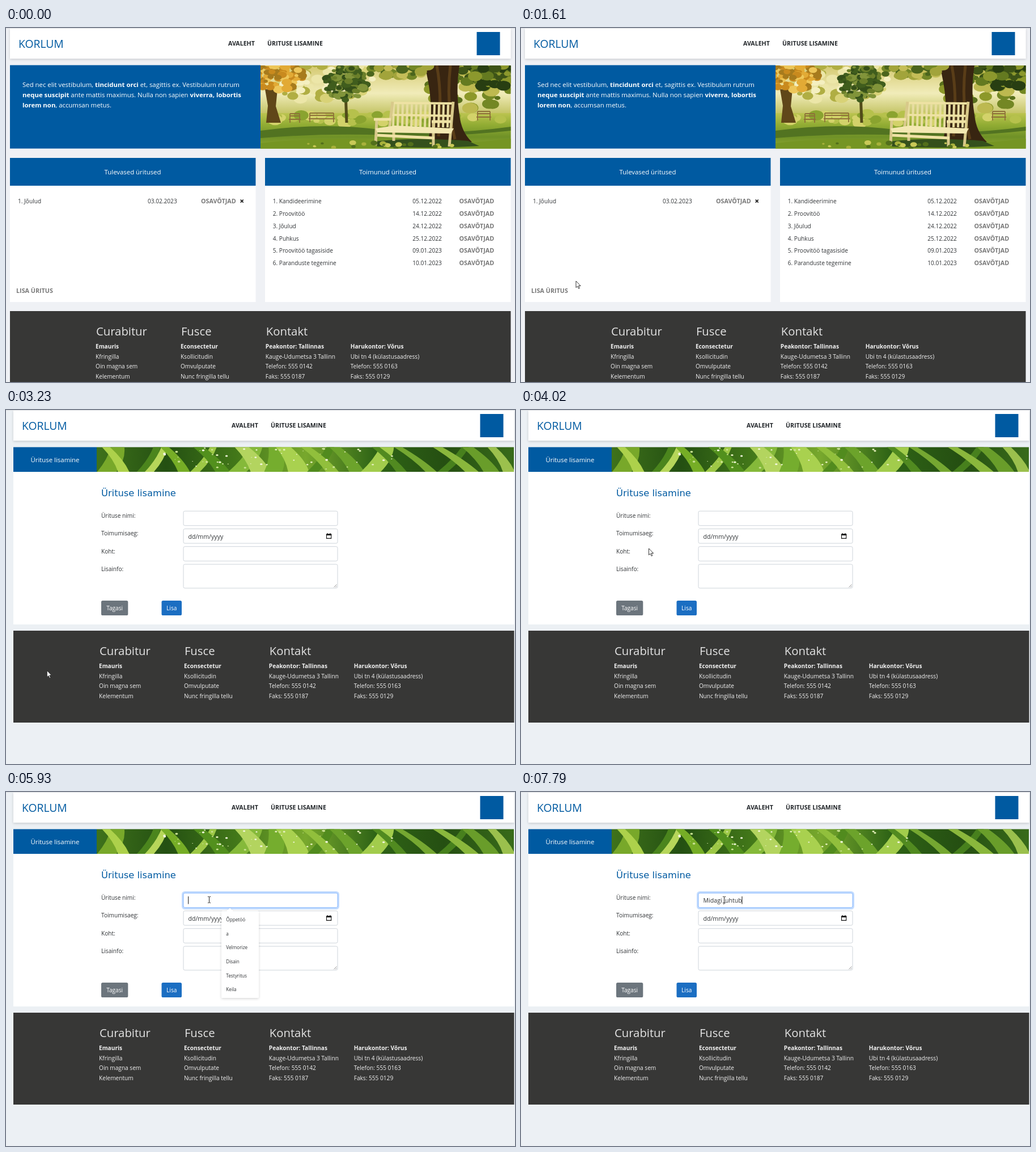
An HTML page that plays this animation: 898x624 px, repeating every 8000 ms.

```html
<!DOCTYPE html>
<html lang="et">
<head>
<meta charset="utf-8">
<title>Ürituste leht</title>
<style>
html, body { margin: 0; width: 100%; height: 100%; overflow: hidden; background: #eff1f5; }
svg { display: block; }
text { font: 10.15px "Open Sans", "Noto Sans", sans-serif; fill: #303336; white-space: pre; }
.mid { text-anchor: middle; }
.lead { font-size: 11.4px; fill: #fff; }
.strong { font-weight: 700; }
.nav { font-size: 10.6px; font-weight: 700; fill: #212529; }
.link { font-size: 10.75px; font-weight: 700; fill: #787878; }
.brand { font-size: 19.3px; fill: #005aa1; }
.foot { fill: #f2f2f2; }
.head { font-size: 20.3px; fill: #e4e4e4; }
.title { font: 16.3px "DejaVu Sans", sans-serif; fill: #005aa1; }
.field { font-size: 10.6px; }
.hint { font-size: 8.2px; }
.btn { fill: #fff; }
</style>
</head>
<body>
<svg id="stage" width="898" height="624" viewBox="0 0 898 624"></svg>
<script>
const BLUE = '#005aa1', DARK = '#373736';
const stage = document.getElementById('stage');

const rect = (x, y, w, h, fill, more = '') =>
  `<rect x="${x}" y="${y}" width="${w}" height="${h}" fill="${fill}" ${more}/>`;
const text = (x, y, s, cls = '', more = '') =>
  `<text x="${x}" y="${y}" class="${cls}" ${more}>${s}</text>`;
const path = (d, fill, more = '') => `<path d="${d}" fill="${fill}" ${more}/>`;
const line = (d, color, width, more = '') =>
  path(d, 'none', `stroke="${color}" stroke-width="${width}" ${more}`);
const clip = (x, y, w, h, body) =>
  `<svg x="${x}" y="${y}" width="${w}" height="${h}" viewBox="${x} ${y} ${w} ${h}">${body}</svg>`;

let seed = 7;
const random = () => (seed = seed * 16807 % 2147483647) / 2147483647;

// Scattered dabs inside an ellipse: foliage, light spots, dew
function dabs(count, cx, cy, rx, ry, size, colors) {
  let out = '';
  for (let i = 0; i < count; i++) {
    const a = random() * 6.283, d = Math.sqrt(random()), r = size * (.5 + random());
    out += `<ellipse cx="${(cx + rx * d * Math.cos(a)).toFixed(1)}" cy="${(cy + ry * d * Math.sin(a)).toFixed(1)}"
      rx="${r.toFixed(1)}" ry="${(r * .7).toFixed(1)}" fill="${colors[i % colors.length]}"/>`;
  }
  return out;
}

function park() {
  let slats = '';
  for (let i = 0; i < 13; i++) slats += `M${684 + i * 8} ${134 + i * .1}l-1 40`;
  const smallBench = (x, y, w) =>
    line(`M${x} ${y}h${w}m0 4h${-w}m-2 6h${w + 4}M${x} ${y}v16M${x + w} ${y}v16`, '#8e7138', 1.8);
  return clip(449, 66, 441.5, 146.5,
    rect(449, 66, 442, 147, 'url(#parkSky)') +
    dabs(100, 555, 90, 95, 38, 8, ['#f4efc0', '#d8d277', '#b0ae43', '#ece6a8']) +
    dabs(60, 820, 100, 80, 44, 10, ['#8c9829', '#59701c', '#bdb950', '#738724']) +
    rect(449, 150, 442, 63, 'url(#parkGrass)') +
    dabs(45, 670, 160, 220, 9, 9, ['#b6c14c', '#8aa32f', '#d3d26a']) +
    path('M457 108h22l-3 30 9 29h-26l3-30Z', '#604719') +
    dabs(100, 478, 82, 46, 27, 7, ['#c98a1e', '#e2aa35', '#a77b1d', '#edc659']) +
    line('M599 112l2 55', '#514b19', 5) +
    dabs(140, 600, 97, 36, 31, 6, ['#405d1d', '#6b7f2a', '#354f19', '#81943a']) +
    smallBench(536, 150, 42) + smallBench(501, 151, 17) + smallBench(832, 147, 22) +
    path('M449 181q110-15 210-2t232-5v7q-110 12-220 8t-222 5Z', '#527321') +
    path('M449 203q120-13 220-3t222-5v18H449Z', '#759523') +
    dabs(65, 850, 82, 60, 23, 9, ['#3d5317', '#647a20', '#283e12', '#8c982d']) +
    path('M738 66H800q-7 45 0 87 3 30 22 48-35 6-78 4 8-44 5-76-2-34-11-63Z', '#382511') +
    line('M760 66q10 52 3 125M784 66q-8 70 8 130', '#593d18', 5) +
    dabs(55, 690, 71, 60, 17, 8, ['#738727', '#a2a43b', '#4b651d', '#c4bd58']) +
    path('M650 200q70-8 165-1l20 9q-90 5-180 1Z', '#34501c') +
    line(slats, '#e7dda1', 4) +
    line('M680 132L790 133M679 153L788 155', '#eee2a3', 4) +
    line('M682 130L676 181M789 130L782 209M654 161L652 207M684 176V199M754 165V209', '#d8c98a', 5) +
    path('M652 177L686 172 790 177 785 186 655 184Z', '#f3e8b1') +
    line('M649 161h30M751 165h34M655 189L756 194', '#efe2a4', 5) +
    dabs(24, 650, 207, 185, 5, 4, ['#c9c957', '#a8b13b', '#526f1b']));
}

function grass() {
  const blade = (from, to, width, color) =>
    path(`M${from} 110Q${(from + to) / 2 + 7} 87 ${to} 65h${width * .7}Q${(from + to) / 2 + width + 5} 88 ${from + width} 110Z`, color);
  const blades = [
    [160, 185, 34, '#78a82a'], [198, 169, 20, '#add14b'], [230, 260, 18, '#4b851d'],
    [244, 274, 16, '#b6d65a'], [304, 272, 21, '#76ad26'], [324, 360, 17, '#9dc846'],
    [370, 330, 26, '#52901d'], [391, 430, 32, '#85b93a'], [432, 403, 35, '#b3d45f'],
    [455, 463, 32, '#75ad2e'], [498, 476, 37, '#a9d14f'], [530, 565, 20, '#518b1e'],
    [565, 520, 23, '#91bf3c'], [606, 570, 27, '#6ca32b'], [625, 660, 35, '#a2cc4c'],
    [689, 645, 19, '#518a20'], [741, 684, 20, '#75a731'], [760, 804, 18, '#47801d'],
    [811, 752, 24, '#8ab73c'], [843, 804, 28, '#699d2a'], [877, 849, 21, '#9bc04d']
  ];
  return clip(160, 65.5, 736, 43.5,
    rect(160, 65, 736, 45, 'url(#meadow)') + blades.map(b => blade(...b)).join('') +
    dabs(60, 480, 83, 210, 24, 1.7, ['#e5f0bc', '#c9e192', '#f2f6dc']));
}

const header = dx =>
  rect(dx + 7, 1, 883.5, 53, '#fff', 'filter="url(#soft)"') +
  text(dx + 22, 34.5, 'KORLUM', 'brand') +
  text(dx + 392, 31.3, 'AVALEHT', 'nav') + text(dx + 461, 31.3, 'ÜRITUSE LISAMINE', 'nav') +
  rect(dx + 830.5, 7, 41, 41, BLUE) + rect(0, 0, 898, 1, '#dddfe2');

function footer(dx, top, height) {
  const columns = [
    ['Curabitur', 'Emauris', 'Kfringilla', 'Oin magna sem', 'Kelementum'],
    ['Fusce', 'Econsectetur', 'Ksollicitudin', 'Omvulputate', 'Nunc fringilla tellu'],
    ['Kontakt', 'Peakontor: Tallinnas', 'Kauge-Udumetsa 3 Tallinn', 'Telefon: 555 0142', 'Faks: 555 0187'],
    ['', 'Harukontor: Võrus', 'Ubi tn 4 (külastusaadress)', 'Telefon: 555 0163', 'Faks: 555 0129']
  ];
  return rect(dx + 7, top, 883.5, height, DARK) + columns.map(([head, ...rows], c) => {
    const x = dx + 158 + c * 149.9;
    return text(x + 1, top + 43, head, 'head') + rows.map((s, i) =>
      text(x, top + 66.3 + i * 17.5, s, i ? 'foot' : 'foot strong')).join('');
  }).join('');
}

function homePage() {
  const b = s => `<tspan class="strong">${s}</tspan>`;
  const panel = (x, s) => rect(x, 229, 433.5, 254, '#fff') + rect(x, 229, 433.5, 49, BLUE) +
    text(x + 216.5, 258, s, 'lead mid');
  const row = (x, i, name, date) => {
    const y = 309.2 + i * 21.8;
    return text(x, y, `${i + 1}. ${name}`) + text(x + (x < 99 ? 229 : 246.5), y, date) +
      text(x + (x < 99 ? 323 : 328.8), y, 'OSAVÕTJAD', 'link');
  };
  const past = [
    ['Kandideerimine', '05.12.2022'], ['Proovitöö', '14.12.2022'], ['Jõulud', '24.12.2022'],
    ['Puhkus', '25.12.2022'], ['Proovitöö tagasiside', '09.01.2023'], ['Paranduste tegemine', '10.01.2023']
  ];
  return rect(0, 0, 898, 624, '#eff1f5') + header(0) +
    rect(7, 65.5, 442, 147, BLUE) + park() +
    text(29, 103.5, `Sed nec elit vestibulum, ${b('tincidunt orci')} et, sagittis ex. Vestibulum rutrum`, 'lead') +
    text(29, 121.8, `${b('neque suscipit')} ante mattis maximus. Nulla non sapien ${b('viverra, lobortis')}`, 'lead') +
    text(29, 140, `${b('lorem non')}, accumsan metus.`, 'lead') +
    panel(7, 'Tulevased üritused') + panel(457, 'Toimunud üritused') +
    row(21, 0, 'Jõulud', '03.02.2023') + line('M413.7 302.7l5 5m0-5l-5 5', '#222', 1.7) +
    past.map((p, i) => row(470.7, i, ...p)).join('') +
    text(18, 467.4, 'LISA ÜRITUS', 'link', 'id="add"') + footer(0, 499, 125);
}

function formPage() {
  const box = (y, h, id = '') =>
    rect(313, y, 272, h, '#fff', `rx="2.6" stroke="#ced4da" ${id}`);
  const button = (x, w, s, fill) => rect(x, 336, w, 26, fill, 'rx="2.6"') +
    text(x + w / 2, 353, s, 'btn mid');
  const labels = ['Ürituse nimi:', 'Toimumisaeg:', 'Koht:', 'Lisainfo:'];
  const hints = ['Õppetöö', 'a', 'Velmorize', 'Disain', 'Testyritus', 'Keila'];
  return rect(0, 0, 898, 624, '#ecf0f4') + header(6) +
    rect(13, 109, 883.5, 269, '#fff') + rect(13, 65.5, 147, 43.5, BLUE) + grass() +
    text(86.5, 92, 'Ürituse lisamine', 'lead mid') + text(168, 152, 'Ürituse lisamine', 'title') +
    labels.map((s, i) => text(168, 190 + i * 31.3, s)).join('') +
    rect(311.5, 176.5, 275, 29, 'none', 'id="ring" rx="4" stroke="#c2dbfe" stroke-width="3"') +
    box(178.2, 25.5, 'id="name"') + box(209.5, 25.5) + box(240.7, 25.5) + box(272, 42) +
    text(321.5, 226.5, 'dd/mm/yyyy', 'field') +
    line('M565.5 219.2h8.2v7.2h-8.2Z', '#111', 1.1) + rect(565, 218.4, 9.2, 2.6, '#111') +
    line('M567.3 217v2m4.6-2v2', '#111', 1.1) +
    line('M578.5 312.5l5-5m-2 5l2-2', '#777', .8) +
    button(168, 47.3, 'Tagasi', '#6c757d') + button(274.5, 35.5, 'Lisa', '#1b6ec2') +
    footer(6, 389, 162) +
    text(321.5, 194.8, '', 'field', 'id="typed"') + rect(321.2, 184, 1, 13.5, '#111', 'id="caret"') +
    `<g id="popup">${path('M382 209.5H389.5L395 204.8 400.5 209.5H444Q446 209.5 446 211.5V361Q446 363 444 363H382Q380 363 380 361V211.5Q380 209.5 382 209.5Z', '#fff', 'filter="url(#soft)"')}${
      hints.map((s, i) => text(388.3, 228.2 + i * 24.6, s, 'hint')).join('')}</g>`;
}

const gradient = (id, dir, stops) => `<linearGradient id="${id}" ${dir}>${
  stops.map((c, i) => `<stop offset="${i / (stops.length - 1)}" stop-color="${c}"/>`).join('')}</linearGradient>`;
const down = 'x2="0" y2="1"';

stage.innerHTML = `<defs>
  ${gradient('parkSky', down, ['#d4c970', '#f1ecb9', '#b3b547', '#8fa631'])}
  ${gradient('parkGrass', down, ['#bcc450', '#91ac33', '#6f9127', '#92aa32'])}
  ${gradient('meadow', '', ['#3f721b', '#245012', '#427719', '#78a82d', '#2f6416', '#254f12', '#386b1a'])}
  <filter id="soft" x="-10%" y="-20%" width="120%" height="150%">
    <feDropShadow dx="0" dy="1.5" stdDeviation="2" flood-color="#000" flood-opacity=".16"/></filter></defs>
  <g id="home">${homePage()}</g><g id="form">${formPage()}</g>
  <circle id="click" r="8" fill="#f5e94a" fill-opacity=".9"/>
  <g id="arrow">${path('M0 0V11.6L2.7 9.2 4.6 13.4 6.4 12.6 4.5 8.5H8.1Z', '#fff', 'stroke="#222" stroke-width=".9"')}</g>
  <g id="beam">${line('M356 184.5h1.7l.8.6.8-.6h1.7M358.5 185v10M356 195.3h1.7l.8-.6.8.6h1.7', '#222', 1)}</g>`;

const el = {};
for (const node of stage.querySelectorAll('[id]')) el[node.id] = node;
const show = (node, on) => node.style.display = on ? '' : 'none';

// [start ms, value]
const moves = [
  [280, [808, 577]], [410, [670, 462]], [550, [586, 407]], [680, [525, 367]], [940, [524, 367]],
  [1070, [378, 359]], [1200, [218, 349]], [1460, [139, 413]], [1610, [97, 446]], [1750, [78, 457]],
  [1880, [72.3, 459.3]], [3890, [145, 355]], [4020, [225.5, 244]], [4290, [249.5, 227.5]], [4440, [317, 200]]
];
const typing = [
  [0, ''], [6320, 'M'], [6570, 'Mid'], [6700, 'Mida'], [6960, 'Midag'], [7100, 'Midagi '],
  [7230, 'Midagi j'], [7380, 'Midagi juh'], [7510, 'Midagi juhtu'], [7790, 'Midagi juhtub']
];
const at = (steps, t) => steps.reduce((value, [start, next]) => t >= start ? next : value, null);
const within = (t, from, to) => t >= from && t < to;

function draw() {
  const t = performance.now() % 8000;
  const pos = at(moves, t);
  show(el.home, t < 3230);
  show(el.form, t >= 3230);
  show(el.arrow, pos && t < 4570);
  show(el.beam, t >= 4570);
  if (pos) el.arrow.setAttribute('transform', `translate(${pos})`);
  el.add.style.fill = t >= 1880 ? '#0a58ca' : '';

  const early = t < 3000;
  show(el.click, within(t, 2130, 2280) || within(t, 4700, 4840));
  el.click.setAttribute('cx', early ? 72.5 : 357.5);
  el.click.setAttribute('cy', early ? 459 : 189);

  show(el.popup, within(t, 4700, 6320));
  show(el.ring, t >= 4840);
  el.name.setAttribute('stroke', t >= 4840 ? '#86b7fe' : t >= 4700 ? '#b0c9ed' : '#ced4da');
  const typed = at(typing, t);
  if (el.typed.textContent !== typed) el.typed.textContent = typed;
  show(el.caret, t >= 4700 && !within(t, 5230, 5930));
  if (t >= 3230) el.caret.setAttribute('x', 321.2 + (typed ? el.typed.getComputedTextLength() : 0));
  requestAnimationFrame(draw);
}
draw();
</script>
</body>
</html>
```
